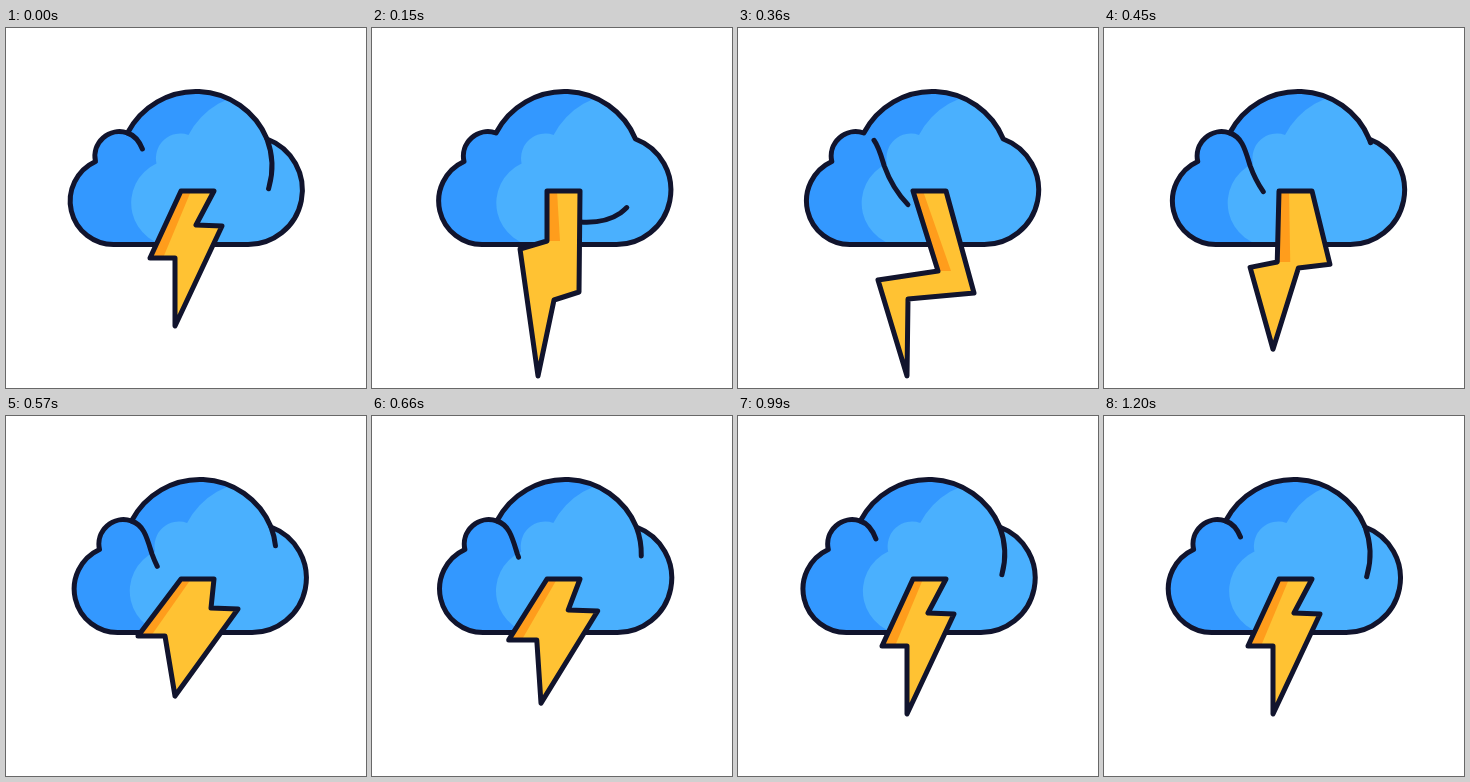
Recreate the animation shown at these times as an HTML page. Size 360 px wide and 360 px high, loop 1230 ms.

```html
<!DOCTYPE html>
<html lang="en">
<head>
<meta charset="utf-8">
<title>Thunder cloud</title>
<style>
  html, body { margin: 0; width: 100%; height: 100%; overflow: hidden; background: #fff; }
  svg { display: block; width: 100vw; height: 100vh; }
  .line { fill: none; stroke: #11142d; stroke-width: 5; stroke-linecap: round; stroke-linejoin: round; }
</style>
</head>
<body>
<svg viewBox="0 0 360 360">
  <defs>
    <path id="shape" d="M109 216.5A43.5 43.5 0 0 1 89.500 133.500A24.500 24.500 0 0 1 121.500 105A77 77 0 0 1 261 111A54.500 54.500 0 0 1 240 216.500Z"/>
    <clipPath id="inside"><use href="#shape"/></clipPath>
  </defs>
  <g id="cloud">
    <use href="#shape" fill="#3398ff"/>
    <g clip-path="url(#inside)"><use id="light" href="#shape" fill="#4ab0fe"/></g>
    <use href="#shape" class="line"/>
    <path id="curl" class="line" pathLength="256" stroke-dasharray="74 182"
      d="M261 111A77 77 0 0 1 263 159C260 172 254 179 246 185C236 192 222 195 206 194C190 193 175 187 167 178C155 166 147 152 142 138C137 122 134 109 121.500 105"/>
  </g>
  <polygon id="bolt" fill="#ffc233"/>
  <polygon id="shade" fill="#ff9d1c"/>
  <polygon id="edge" class="line"/>
</svg>
<script>
const LOOP = 1230, STEP = 30;
const times = [0, 150, 360, 570, 780, 990, 1200];
const drift = [0, 2.5, 4.3, 4, 2.2, 0.8, 0.1];
const curlStart = [-23, 73, 169, 201.5, 222, 231, 233];

// Five moving corners, clockwise from the inner right one; the top edge stays fixed.
const rest = [190, 197, 216, 198, 169, 298, 169, 230, 144, 230];
const poses = [
  rest,
  [207, 264, 182, 272, 166, 348, 148, 221, 175, 213],
  [236, 265, 170, 271, 169, 348, 140, 252, 200, 243],
  [205, 192, 232, 193, 169, 280, 159, 220, 132, 220],
  rest, rest, rest
];
const corners = rest.map((_, i) => poses.map(pose => pose[i]));

const el = id => document.getElementById(id);

// Monotone cubic interpolation through the keys.
function track(keys, t) {
  const last = keys.length - 1;
  if (t >= times[last]) return keys[last];
  const slope = i => (keys[i + 1] - keys[i]) / (times[i + 1] - times[i]);
  const tangent = i => {
    if (i === 0 || i === last) return 0;
    const a = slope(i - 1), b = slope(i);
    return a * b > 0 ? 2 * a * b / (a + b) : 0;
  };
  const i = times.findIndex(time => time > t) - 1;
  const span = times[i + 1] - times[i], u = (t - times[i]) / span;
  const ease = u * u * (3 - 2 * u);
  return keys[i] + (keys[i + 1] - keys[i]) * ease
    + span * u * (1 - u) * ((1 - u) * tangent(i) - u * tangent(i + 1));
}

function draw(now) {
  const t = Math.floor(now % LOOP / STEP) * STEP;
  const x = track(drift, t);
  el('cloud').setAttribute('transform', `translate(${x})`);
  el('light').setAttribute('transform', `translate(${61 - 1.35 * x} 2)`);
  el('curl').setAttribute('stroke-dashoffset', -track(curlStart, t));

  const p = corners.map(keys => track(keys, t));
  const points = [175, 163, 208, 163, ...p].join(' ');
  el('bolt').setAttribute('points', points);
  el('edge').setAttribute('points', points);
  el('shade').setAttribute('points', [175, 163, 185, 163, p[8] + 13, p[9], p[8], p[9]].join(' '));
  requestAnimationFrame(draw);
}
requestAnimationFrame(draw);
</script>
</body>
</html>
```
